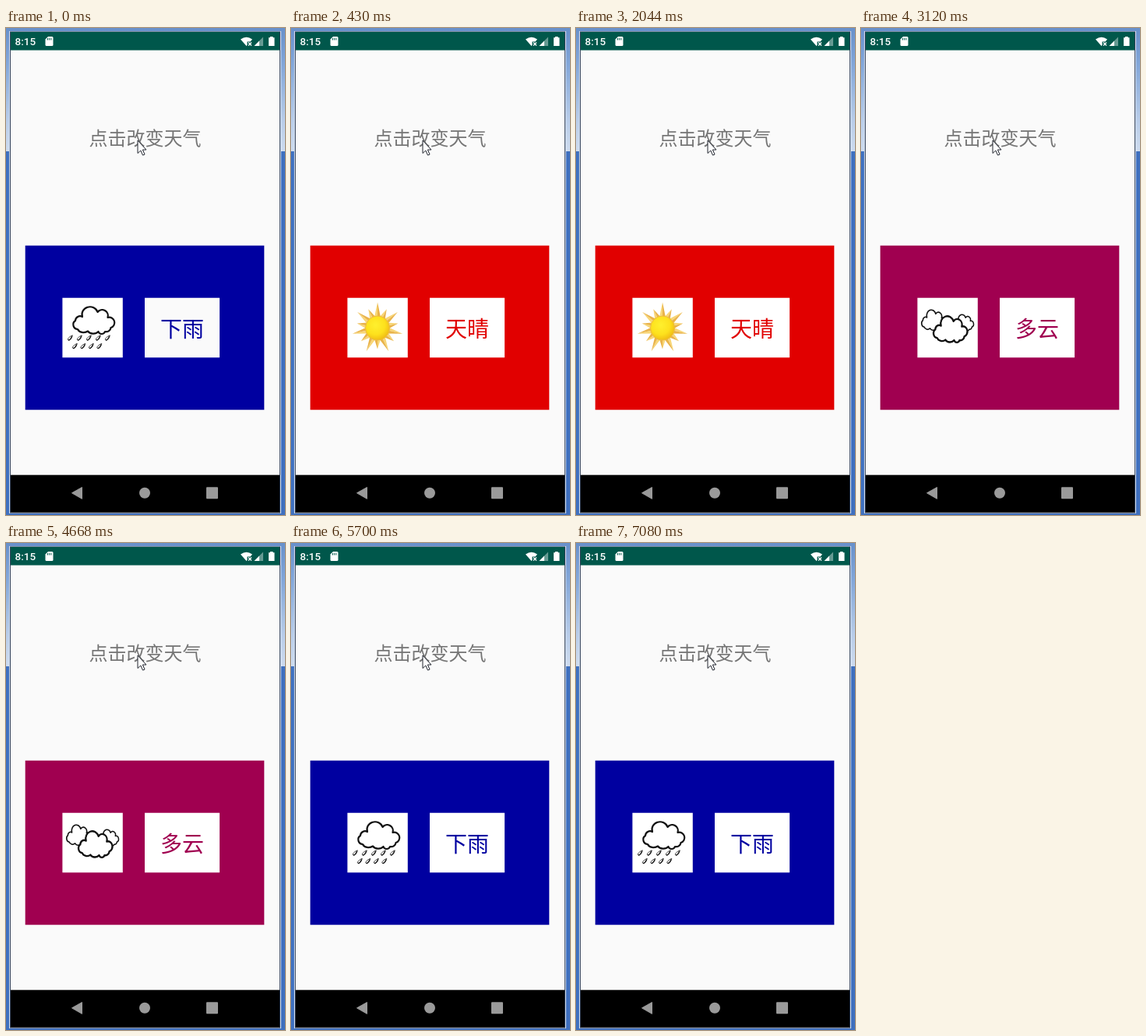
Recreate the animation shown at these times as an HTML page. Size 358 by 624 pixels, loop 8000 ms.

```html
<!DOCTYPE html>
<html lang="zh-CN">
<head>
<meta charset="utf-8">
<title>天气</title>
<style>
html, body { margin: 0; width: 100%; height: 100%; overflow: hidden; background: #3f70bf; }
svg { display: block; width: 358px; height: 624px; }
text { font-family: "Noto Sans CJK SC", "Noto Sans CJK", "Noto Sans CJK JP", sans-serif; text-anchor: middle; }
.clock { font: 500 13.5px Roboto, sans-serif; text-anchor: start; }
.label { font-size: 28px; }
.ink { fill: #fff; stroke: #111; stroke-linejoin: round; }
.scene { visibility: hidden; animation: 8s step-end infinite; }
.rain { animation-name: rain; }
.sun { animation-name: sun; }
.cloudy { animation-name: cloudy; }
.tint { animation: tint 8s step-end infinite; }
@keyframes rain { 0%, 71.25%, 100% { visibility: visible } 5.375% { visibility: hidden } }
@keyframes sun { 0%, 39%, 100% { visibility: hidden } 5.375% { visibility: visible } }
@keyframes cloudy { 0%, 71.25%, 100% { visibility: hidden } 39% { visibility: visible } }
@keyframes tint { 0%, 100% { fill: #fafafa } 5.375% { fill: #fff } }
</style>
</head>
<body>
<svg viewBox="0 0 358 624">
  <defs>
    <linearGradient id="sky" x2="0" y2="1">
      <stop offset="0" stop-color="#6890cb"/>
      <stop offset=".3" stop-color="#83a7d9"/>
      <stop offset=".75" stop-color="#b9cde9"/>
      <stop offset="1" stop-color="#cddbee"/>
    </linearGradient>
    <radialGradient id="disc" cx=".42" cy=".38" r=".65">
      <stop offset="0" stop-color="#fff02e"/>
      <stop offset=".6" stop-color="#fde11d"/>
      <stop offset="1" stop-color="#efb913"/>
    </radialGradient>
    <path id="cloud" vector-effect="non-scaling-stroke" d="M98 370A10 9.500 0 0 1 117.500 364A7.500 7.500 0 0 1 130.500 371A6.500 6.500 0 0 1 134.500 384A6 5.500 0 0 1 127 389A4.500 4.500 0 0 1 118.500 389A8 6 0 0 1 105 388.500A8 6 0 0 1 92 386A6 6 0 0 1 89 375A6 6 0 0 1 98 370Z"/>
    <g id="drop" stroke-width=".9">
      <path d="M3 -4.5C3 0 1 4 -1.5 4C-4 3.5 -2 -1 3 -4.5Z"/>
      <path d="M2.4 -3C2.2 0 .5 3.5 -1.5 3.6" fill="none" stroke-width="1.5"/>
    </g>
    <path id="panel" d="M24.700 278.700H331.300V489.300H24.700Z"/>
    <path id="icon" d="M72.400 345.800H149.800V422.200H72.400Z"/>
    <path id="plate" d="M178 345.800H274.100V422.200H178Z"/>
  </defs>

  <rect width="358" height="624" fill="#3f70bf"/>
  <rect width="358" height="158" fill="url(#sky)"/>
  <rect x="4.5" y="4.5" width="348" height="617" fill="#fafafa" stroke="#d5e0ef"/>
  <rect x="5.5" y="5" width="346" height="616" fill="none" stroke="#33425c"/>
  <rect x="6" y="5" width="345" height="23.5" fill="#00574b"/>
  <rect x="6" y="572.700" width="345" height="48" fill="#000"/>

  <g fill="#fff">
    <text class="clock" x="11.5" y="22">8:15</text>
    <path d="M54 11H59Q60.500 11 60.500 12.500V21.500Q60.500 23 59 23H52Q50.500 23 50.500 21.500V14.500Z"/>
    <path d="M53.500 13v2.500M55.700 13v2.500M57.900 13v2.500" stroke="#00574b"/>
    <path d="M301 14.500Q308.500 9 316 14.500L313.500 17.500H309.500V22L308.500 23Z"/>
    <path d="M311 18.500l4 4m0-4l-4 4" stroke="#fff" stroke-width="1.3"/>
    <path d="M318.500 23L330 11.500V23Z" opacity=".4"/>
    <path d="M318.500 23L325 16.500V23Z"/>
    <path d="M339 11h3.500v1.300H344.500V23H337V12.300H339Z"/>
  </g>

  <text x="178.500" y="150" font-size="24" fill="#757575">点击改变天气</text>
  <path d="M169 144V160.500L172.800 157L175.500 163L178 162L175.400 156H180Z" fill="#fff" stroke="#20242e"/>

  <g class="scene rain">
    <use href="#panel" fill="#0000a0"/>
    <use href="#icon" fill="#fff"/>
    <use class="tint" href="#plate"/>
    <g class="ink">
      <use href="#cloud" stroke-width="2.200"/>
      <g id="drops"></g>
    </g>
    <text class="label" x="226" y="395.500" fill="#0000a0">下雨</text>
  </g>

  <g class="scene sun">
    <use href="#panel" fill="#e10000"/>
    <use href="#icon" fill="#fff"/>
    <use href="#plate" fill="#fff"/>
    <g transform="translate(111 384.500)">
      <g id="rays"></g>
      <circle r="15.500" fill="url(#disc)" stroke="#eebc3e"/>
    </g>
    <text class="label" x="226" y="395.500" fill="#e10000">天晴</text>
  </g>

  <g class="scene cloudy">
    <use href="#panel" fill="#a00050"/>
    <use href="#icon" fill="#fff"/>
    <use href="#plate" fill="#fff"/>
    <g class="ink">
      <use href="#cloud" transform="translate(27.700 89.700) scale(.58 .76)" stroke-width="1.600"/>
      <use href="#cloud" transform="translate(79 152.800) scale(.47 .6)" stroke-width="1.500"/>
      <use href="#cloud" transform="translate(22.300 22.700) scale(.82 .97)" stroke-width="2.300"/>
    </g>
    <text class="label" x="226" y="395.500" fill="#a00050">多云</text>
  </g>

  <g fill="#9a9a9a">
    <path d="M84.500 595.800L97.500 588.500V603.300Z" stroke="#9a9a9a" stroke-linejoin="round"/>
    <circle cx="178" cy="595.700" r="7"/>
    <rect x="257" y="588.300" width="15" height="15" rx="1"/>
  </g>
</svg>
<script>
const fill = (id, html) => document.getElementById(id).innerHTML = html;

let drops = "";
for (let i = 0; i < 9; i++) {
  const low = i > 4;
  const x = low ? 88 + (i - 5) * 10.5 : 82 + i * 12;
  drops += `<use href="#drop" transform="translate(${x} ${low ? 407.5 : 397}) rotate(12) scale(.85)"/>`;
}
fill("drops", drops);

// Each ray is two slim triangles, lit on one side.
let rays = "";
for (let i = 0; i < 14; i++) {
  const tip = i % 2 ? -27 : -33;
  rays += `<g transform="rotate(${i * 360 / 14})">
    <path d="M0 ${tip}L-4 -14H0Z" fill="#f8d676"/>
    <path d="M0 ${tip}L4 -14H0Z" fill="#e9b34a"/></g>`;
}
fill("rays", rays);
</script>
</body>
</html>
```
